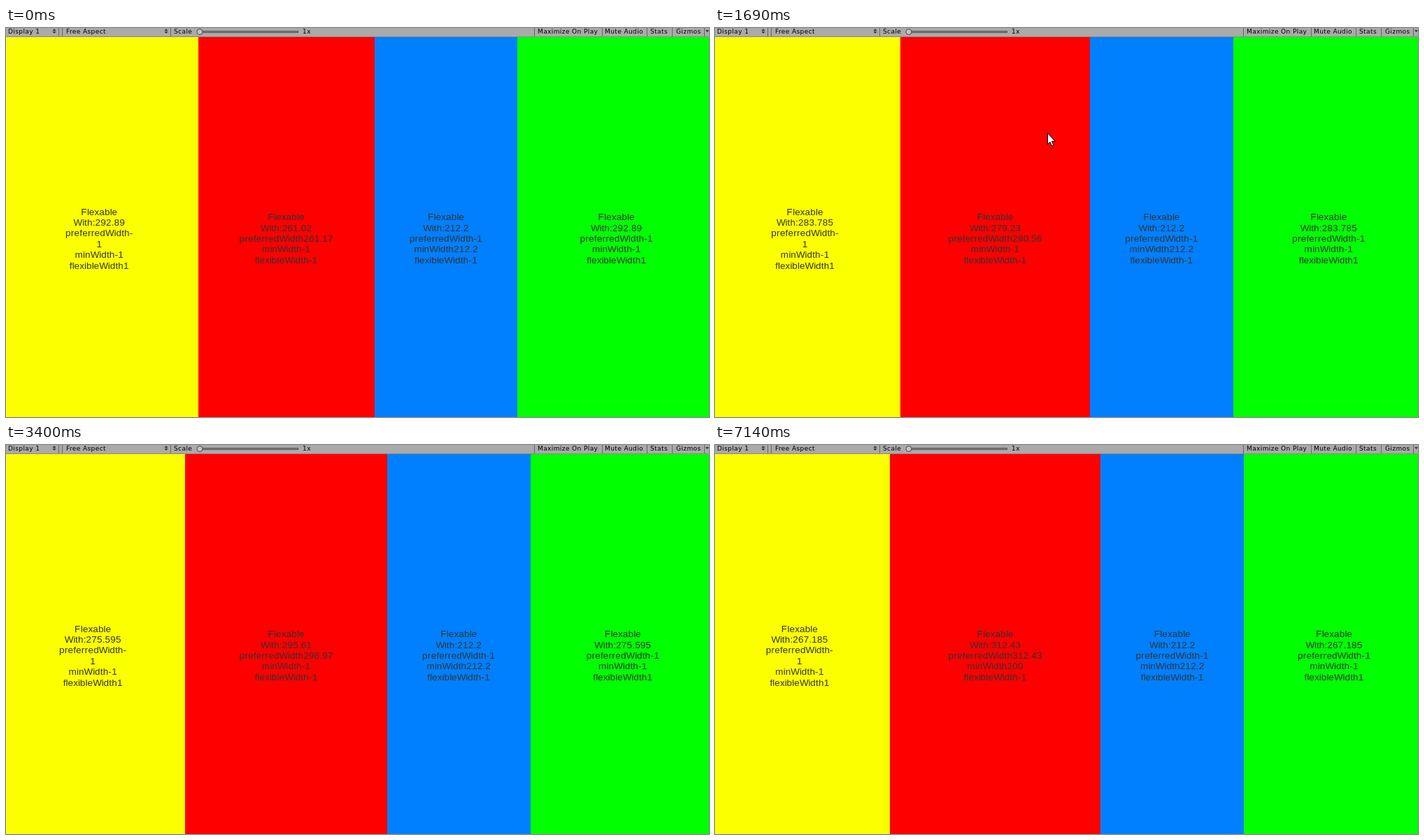
Write an HTML page with a canvas that moves like this. It is 1005x557 px and loops after 8000 ms.

```html
<!DOCTYPE html>
<html lang="en">
<head>
<meta charset="utf-8">
<title>Layout widths</title>
<style>
  html, body { margin: 0; width: 100%; height: 100%; overflow: hidden; background: #aaa; }
  canvas { display: block; }
</style>
</head>
<body>
<canvas id="stage" width="1005" height="557"></canvas>
<script>
const ctx = document.getElementById('stage').getContext('2d');
const LOOP = 8000, TOTAL = 1059, MIN_WIDTH = 212.2;
const SCALE = 0.965, LEFT = -8, TOP = 13;
const LABEL_SIZE = 13.5, LINE_HEIGHT = 15.4;
const LABEL_FONT = '"Liberation Sans", Arial, sans-serif';

// Each drag updates the width in steps: [start, end, step length].
const drags = [
  [0, 60, 60], [60, 530, 52], [680, 1300, 50],
  [1470, 2250, 52], [2290, 3090, 51], [3140, 3930, 52]
];

// The dragged width swings smoothly through these points: [time, width].
const swing = [
  [-60, 261.02], [0, 261.17], [530, 258], [680, 258], [1030, 273.17],
  [1300, 274.8], [1470, 275.4], [2290, 298.38], [2590, 312],
  [2800, 306.46], [3250, 291.5], [3400, 298.97], [3500, 306], [3930, 312.43]
];

// The minimum width is typed in digit by digit.
const typed = [[0, -1], [4960, 0], [6650, 2], [6890, 20], [7140, 200]];

const lastStarted = (list, t) => list.filter(item => item[0] <= t).pop();
const trim = n => String(+n.toFixed(3));
const flexible = width => (TOTAL - MIN_WIDTH - width) / 2;
const slope = ([t0, a], [t1, b]) => (b - a) / (t1 - t0);

// Flat at turning points, otherwise parallel to the neighbours.
function tangent(i) {
  const before = swing[i - 1], after = swing[i + 1];
  if (!before || !after) return 0;
  const turning = slope(before, swing[i]) * slope(swing[i], after) <= 0;
  return turning ? 0 : slope(before, after);
}

function widthAt(t) {
  const next = swing.findIndex(key => key[0] > t);
  if (next < 0) return swing[swing.length - 1][1];
  const [t0, a] = swing[next - 1], [t1, b] = swing[next];
  const span = t1 - t0, u = (t - t0) / span, v = 1 - u;
  const width = a * v * v * (1 + 2 * u) + b * u * u * (1 + 2 * v)
    + span * u * v * (tangent(next - 1) * v - tangent(next) * u);
  return Math.round(width * 100) / 100;
}

function rect(x, y, w, h, color) {
  ctx.fillStyle = color;
  ctx.fillRect(x, y, w, h);
}

function polygon(points, fill, stroke) {
  ctx.beginPath();
  points.forEach(([x, y]) => ctx.lineTo(x, y));
  ctx.closePath();
  ctx.fillStyle = fill;
  ctx.fill();
  if (stroke) {
    ctx.strokeStyle = stroke;
    ctx.stroke();
  }
}

// Glyph advances are rounded to whole units before the view is scaled.
function drawLine(text, center, baseline) {
  ctx.font = '14px ' + LABEL_FONT;
  const advances = [...text].map(c => Math.round(ctx.measureText(c).width) * SCALE);
  let x = center - advances.reduce((sum, a) => sum + a, 0) / 2;
  ctx.font = LABEL_SIZE + 'px ' + LABEL_FONT;
  [...text].forEach((c, i) => {
    ctx.fillText(c, x, baseline);
    x += advances[i];
  });
}

function drawLabel(lines, center) {
  ctx.fillStyle = '#323232';
  lines.forEach((line, i) =>
    drawLine(line, center, 306 + (i - (lines.length - 1) / 2) * LINE_HEIGHT));
}

function drawToolbar() {
  rect(0, 0, 1005, 12, '#aaaaaa');
  rect(0, 12, 1005, 1, '#8c8c8c');
  for (const x of [75, 80, 235, 755, 852, 916, 952, 998]) rect(x, 0, 1, 12, '#666');

  ctx.font = '9px "DejaVu Sans", sans-serif';
  ctx.letterSpacing = '0.4px';
  ctx.fillStyle = '#000';
  const items = [
    ['Display 1', 3], ['Free Aspect', 86], ['Scale', 240], ['1x', 424],
    ['Maximize On Play', 760], ['Mute Audio', 856], ['Stats', 921], ['Gizmos', 958]
  ];
  for (const [text, x] of items) ctx.fillText(text, x, 8);
  ctx.letterSpacing = '0px';

  for (const x of [69, 229]) {
    polygon([[x - 2.5, 4], [x + 2.5, 4], [x, 1]], '#333');
    polygon([[x - 2.5, 5], [x + 2.5, 5], [x, 8]], '#333');
  }
  polygon([[1000, 3], [1005, 3], [1002.5, 6]], '#333');

  rect(277, 4, 141, 3, '#555');
  rect(278, 5, 139, 1, '#888');
  ctx.beginPath();
  ctx.arc(277, 5.5, 4, 0, 2 * Math.PI);
  ctx.fillStyle = '#c4c4c4';
  ctx.fill();
  ctx.strokeStyle = '#444';
  ctx.stroke();
}

function drawCursor(x, y) {
  const arrow = [[0, 0], [0, 16], [3.5, 12.7], [6, 18.5], [8.5, 17.5], [6, 11.8], [10.8, 11.8]];
  polygon(arrow.map(([dx, dy]) => [x + dx + 0.5, y + dy + 0.5]), '#fff', '#000');
}

function draw(t) {
  const [start, end, step] = lastStarted(drags, t);
  const now = Math.min(start + Math.floor((t - start) / step) * step, end);
  const preferred = widthAt(now);
  // The "With" readings trail the layout by one step while dragging.
  const shown = now < end ? widthAt(now - step) : preferred;
  const rest = trim(flexible(shown));
  const minWidth = lastStarted(typed, t)[1];

  const panels = [
    ['#fcff00', flexible(preferred),
      [rest, 'preferredWidth-', '1', 'minWidth-1', 'flexibleWidth1']],
    ['#ff0000', preferred,
      [trim(shown), 'preferredWidth' + trim(preferred), 'minWidth' + minWidth, 'flexibleWidth-1']],
    ['#0080ff', MIN_WIDTH,
      [trim(MIN_WIDTH), 'preferredWidth-1', 'minWidth' + MIN_WIDTH, 'flexibleWidth-1']],
    ['#00ff00', flexible(preferred),
      [rest, 'preferredWidth-1', 'minWidth-1', 'flexibleWidth1']]
  ];

  drawToolbar();
  let x = LEFT;
  for (const [color, width, [reading, ...lines]] of panels) {
    const w = width * SCALE, edge = Math.round(x);
    rect(edge, TOP, Math.round(x + w) - edge, 557 - TOP, color);
    drawLabel(['Flexable', 'With:' + reading, ...lines], x + w / 2);
    x += w;
  }
  // The dragging pointer moves one pixel per 0.03 units of width.
  drawCursor(Math.round(229 + (preferred - 273.17) / 0.03), 150);
}

const begin = performance.now();
function frame() {
  draw((performance.now() - begin) % LOOP);
  requestAnimationFrame(frame);
}
frame();
</script>
</body>
</html>
```
